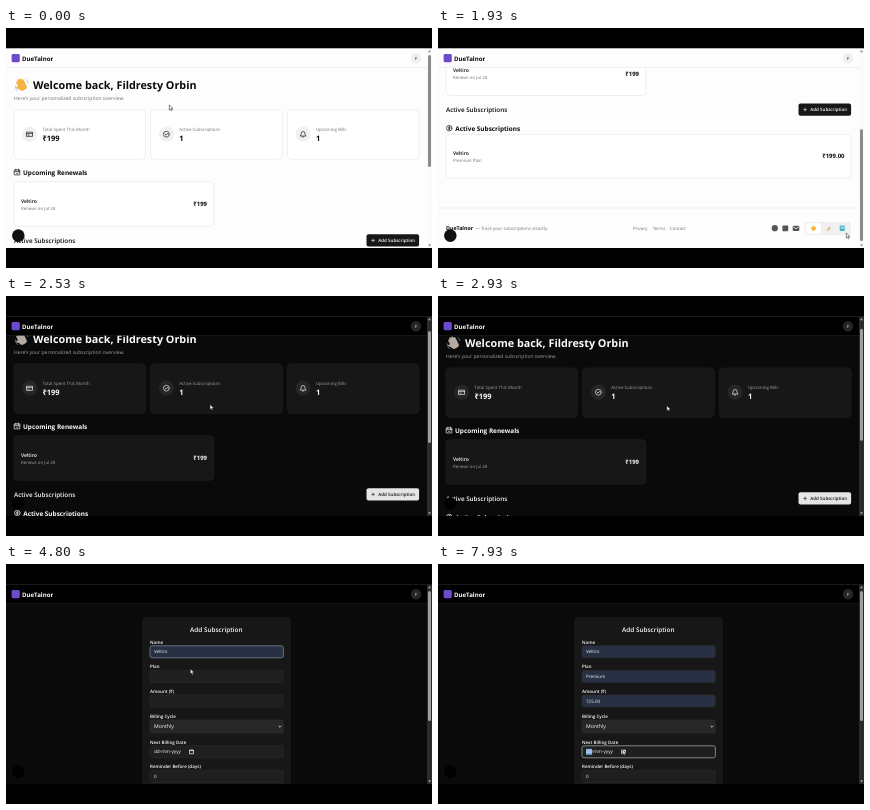
These frames come from a looping animation (426x240 px, 8000 ms). An HTML page:

```html
<!DOCTYPE html>
<html lang="en">
<head>
<meta charset="utf-8">
<title>Subscription dashboard</title>
<style>
html, body { margin: 0; width: 100%; height: 100%; overflow: hidden; background: #000; }
svg { display: block; width: 100%; height: 100%; }
svg {
  --bg: #fdfdfd; --head: #fdfdfd; --edge: #fdfdfd; --card: #fff; --line: #e4e4e4; --ink: #0a0a0a; --mute: #737373;
  --soft: #f0f0f0; --btn: #171717; --btnInk: #fafafa; --track: #fafafa; --thumb: #8b8b8b; --pick: #fff;
  --icon: #555; --badge: #111; --hand: #f3b33e;
}
svg.dark {
  --bg: #0a0a0a; --head: #000; --edge: #2c2c2c; --card: #171717; --line: #222; --ink: #fafafa; --mute: #a1a1a1;
  --soft: #262626; --btn: #e5e5e5; --btnInk: #171717; --track: #2b2b2b; --thumb: #9f9f9f; --pick: #a9b0b3;
  --icon: #b4b4b4; --badge: #000; --hand: #b5aaa2;
}
svg.dark.hover { --btn: #c4c4c4; }
text { font-family: "Open Sans", "Noto Sans", sans-serif; fill: var(--ink); text-rendering: geometricPrecision; white-space: pre; }
.b { font-weight: 700; }
.s { font-weight: 600; }
.m { fill: var(--mute); }
.bg { fill: var(--bg); }
.head { fill: var(--head); }
.card { fill: var(--card); stroke: var(--line); stroke-width: .6; }
.soft { fill: var(--soft); }
.rule { stroke: var(--line); stroke-width: .6; }
.btn { fill: var(--btn); }
.btnInk { fill: var(--btnInk); }
.icon { fill: none; stroke: var(--ink); stroke-width: .65; stroke-linecap: round; stroke-linejoin: round; }
.thumb { fill: var(--thumb); }
.gray { fill: var(--icon); }
.field { fill: #1f1f1f; stroke: #2c2c2c; stroke-width: .6; }
#cycleBox { fill: #272727; }
.filled { fill: #283143; }
.focus { stroke: #858585; stroke-width: 1; }
.filled.focus { stroke: #66707f; }
</style>
</head>
<body>
<svg id="stage" viewBox="0 0 426 240"></svg>
<script>
const LOOP = 8000, MAX_SCROLL = 130.8;
const APP = 'DueTalnor', USER = 'Fildresty Orbin', SERVICE = 'Veltiro';

const text = (x, y, size, cls, str, anchor = 'start', id = '') =>
  `<text x="${x}" y="${y}" font-size="${size}" class="${cls}" text-anchor="${anchor}" ${id && `id="${id}"`}>${str}</text>`;
const rect = (x, y, w, h, r, cls, extra = '') =>
  `<rect x="${x}" y="${y}" width="${w}" height="${h}" rx="${r}" class="${cls}" ${extra}/>`;
const circle = (x, y, r, cls, extra = '') => `<circle cx="${x}" cy="${y}" r="${r}" class="${cls}" ${extra}/>`;
const icon = (x, y, d) => `<path class="icon" transform="translate(${x} ${y})" d="${d}"/>`;

const ICONS = {
  wallet: 'M-2.8-2H2.8V2.2H-2.8ZM-2.8-.6H2.8M-1.6 1H-.6',
  check: 'M2.9 0A2.9 2.9 0 1 1-2.9 0A2.9 2.9 0 1 1 2.9 0M-1.2 0L-.3 .9L1.3-.8',
  bell: 'M-2.7 1.6Q-1.8 .8-1.8-.9A1.8 1.8 0 0 1 1.8-.9Q1.8 .8 2.7 1.6ZM-.6 2.8H.6',
  calendar: 'M-2.6-2.2H2.6V2.8H-2.6ZM-2.6-.5H2.6M-1.3-3V-1.5M1.3-3V-1.5M-.8 1.1L-.1 1.8L1.1 .5',
  coin: 'M2.8 0A2.8 2.8 0 1 1-2.8 0A2.8 2.8 0 1 1 2.8 0M1-1H-.4Q-1.3-.4-.4 0H.4Q1.3 .5 .4 1H-1M0-1.7V1.7'
};

const hand = `<g transform="translate(15.5 57) rotate(-28)" stroke-linecap="round" stroke="var(--hand)" stroke-width="2.1" fill="var(--hand)">
  <path d="M-2.6 0V-4.2M-.7 0V-5.6M1.3 0V-5.3M3.1 .6V-3.8M-2 3L-5 .2" />
  <rect x="-2.8" y="-.5" width="5.8" height="5.2" rx="2"/></g>
  <path d="M9.3 57.5Q9.3 61.5 12 63M19.5 51Q21.8 52.5 22 55" fill="none" stroke="#7fa9c9" stroke-width=".6"/>`;

const stat = (x, glyph, label, value) =>
  rect(x, 82, 131.6, 49.3, 4, 'card') + circle(x + 15.7, 106.2, 7.6, 'soft') + icon(x + 15.7, 106.2, ICONS[glyph]) +
  text(x + 28.5, 102.8, 4.42, 'm', label) + text(x + 28.5, 113, 7.5, 'b', value);

const footer = `<path class="rule" d="M0 310.8H421"/>` +
  text(8, 333.3, 5.3, 'b', APP) + text(37.5, 333, 4.4, 'm', '— Track your subscriptions smartly.') +
  text(195, 333, 4.4, 'm', 'Privacy') + text(214.7, 333, 4.4, 'm', 'Terms') + text(232, 333, 4.4, 'm', 'Contact') +
  circle(336.8, 331, 3.1, 'gray') + rect(344.4, 328.2, 5.8, 5.8, .8, 'gray') +
  rect(354.7, 328.5, 6.6, 5.2, .8, 'gray') + `<path d="M355 329.4L358 331.6L361 329.4" fill="none" stroke="var(--bg)" stroke-width=".7"/>` +
  rect(366.5, 324.6, 46.5, 13.4, 3, 'soft') + rect(368, 326, 15, 10.5, 2.5, '', 'id="pick" fill="var(--pick)"') +
  circle(375.5, 331.2, 2, '', 'fill="#f7b733" stroke="#f29b2b" stroke-width="1" stroke-dasharray=".8 .5"') +
  `<path d="M391.2 328.6A2.6 2.6 0 1 1 387.8 332.6A3.4 3.4 0 0 0 391.2 328.6" fill="#efb04a"/>` +
  rect(401.7, 328.3, 5, 5.6, .6, '', 'fill="#45b3c9"') + rect(402.5, 329.2, 3.4, 2.4, .2, '', 'fill="#8fdcea"');

const dashboard = hand +
  text(27, 61, 10.8, 'b', `Welcome back, ${USER}`) +
  text(8, 71.5, 5, 'm', 'Here’s your personalized subscription overview.') +
  stat(8, 'wallet', 'Total Spent This Month', '₹199') +
  stat(144.7, 'check', 'Active Subscriptions', '1') +
  stat(281.4, 'bell', 'Upcoming Bills', '1') +
  icon(11.2, 144.1, ICONS.calendar) + text(17, 146.5, 6.42, 'b', 'Upcoming Renewals') +
  rect(8, 153.7, 199.8, 44.6, 4, 'card') +
  text(15, 175.2, 5, 's', SERVICE) + text(15, 182, 4.37, 'm', 'Renews on Jul 28') + text(201, 178.4, 6, 'b', '₹199', 'end') +
  text(8, 214.8, 6.3, 's', 'Active Subscriptions') +
  rect(360.5, 206.3, 52.6, 12.2, 2, 'btn') +
  `<path d="M365.3 212.4H368.9M367.1 210.6V214.2" stroke="var(--btnInk)" stroke-width=".6"/>` +
  text(372.3, 214, 4.5, 'btnInk s', 'Add Subscription') +
  icon(11.3, 231, ICONS.coin) + text(17.3, 233.5, 6.42, 'b', 'Active Subscriptions') +
  rect(8, 237.4, 405, 43.6, 4, 'card') +
  text(15, 258.2, 5, 's', SERVICE) + text(15, 265, 4.37, 'm', 'Premium Plan') + text(406.5, 261.3, 6, 'b', '₹199.00', 'end') +
  footer;

const field = (id, label, y, h, value = '', size = 4.5) =>
  text(144, y - 2.3, 4.5, 's', label) + rect(144, y, 133.4, h, 2, 'field', `id="${id}Box"`) +
  text(148, y + h / 2 + 1.6, size, '', value, 'start', `${id}Text`);

const form = rect(136, 53.2, 149, 180, 4, '', 'fill="#171717"') +
  text(210.3, 68.1, 6.4, 's', 'Add Subscription', 'middle') +
  field('name', 'Name', 81.8, 12) + field('plan', 'Plan', 106.4, 12) + field('amount', 'Amount (₹)', 131, 12) +
  field('cycle', 'Billing Cycle', 156, 13, 'Monthly', 5.2) +
  `<path d="M272.6 161.8L274 163.2L275.4 161.8" fill="none" stroke="#fff" stroke-width=".7"/>` +
  field('date', 'Next Billing Date', 181.8, 12) +
  rect(148, 184.8, 6.2, 6, 0, '', 'id="dayMark" fill="#79a7dc"') + text(148, 189.4, 4.7, '', 'dd-mm-yyyy') +
  `<path d="M183.6 186H187.4V189.8H183.6ZM183.6 186.6H187.4" fill="none" stroke="#fff" stroke-width=".7"/>` +
  field('days', 'Reminder Before (days)', 206.4, 12.4, '0') +
  `<path id="spin" d="M268.6 136.2L270.2 134.3L271.8 136.2ZM268.6 138.2L270.2 140.1L271.8 138.2Z" fill="#ccc"/>` +
  rect(0, 0, .5, 5.4, 0, '', 'id="caret" fill="#fff"');

const stage = document.getElementById('stage');
stage.innerHTML = rect(0, 20.5, 426, 200, 0, 'bg') +
  `<g id="dashboard">${dashboard}</g><g id="form">${form}</g>` +
  rect(0, 20.5, 421, 18.8, 0, 'head') + `<path class="rule" d="M0 39.4H421"/>` +
  rect(5.6, 26, 8.2, 8.2, 1.4, '', 'fill="#6d4bd0"') + text(16, 32.5, 6.1, 'b', APP) +
  circle(410, 30.2, 5.2, 'soft') + text(410, 31.7, 4.3, '', USER[0], 'middle') +
  circle(12.3, 207.6, 6.3, '', 'fill="var(--badge)"') +
  rect(421, 20.5, 5, 199.5, 0, '', 'fill="var(--track)"') + rect(422, 27, 3, 112, 1.5, 'thumb', 'id="thumb"') +
  `<path class="thumb" d="M422 24.2L423.5 22L425 24.2ZM422 216.3L423.5 218.5L425 216.3Z"/>` +
  rect(0, 20.2, 426, .8, 0, '', 'fill="var(--edge)"') +
  `<path id="arrow" d="M0 0V5L1.2 4L2 5.7L2.9 5.3L2.1 3.6H3.7Z" fill="#fff" stroke="#111" stroke-width=".5"/>` +
  `<path id="beam" d="M-.9-2.6H.9M0-2.6V2.6M-.9 2.6H.9" stroke="#aaa" stroke-width=".5"/>` +
  `<path d="M0 0H426V20.2H0ZM0 220H426V240H0Z"/>`;

const $ = id => document.getElementById(id);
const show = (id, on) => $(id).setAttribute('visibility', on ? 'visible' : 'hidden');

// Keys are [time, ...values]; values ease between neighbouring keys.
function track(keys, t) {
  const i = keys.findIndex(k => k[0] > t);
  if (i < 0) return keys[keys.length - 1].slice(1);
  if (i === 0) return keys[0].slice(1);
  const a = keys[i - 1], b = keys[i];
  const u = (t - a[0]) / (b[0] - a[0]), e = u * u * (3 - 2 * u);
  return a.slice(1).map((v, j) => v + (b[j + 1] - v) * e);
}
const latest = (keys, t) => keys.reduce((v, k) => (t >= k[0] ? k[1] : v), '');

const SCROLL = [[330, 0], [1130, MAX_SCROLL], [2070, MAX_SCROLL], [2530, 14], [2680, 0], [2870, 0], [3230, MAX_SCROLL]];
const POINTER = [
  [0, 163.3, 77], [330, 166, 84], [1130, 300, 150], [1700, 404, 200], [1930, 408.3, 205], [2070, 404, 202],
  [2530, 204, 108.5], [2850, 215, 112], [3330, 397.4, 81], [3800, 398, 82], [4250, 200, 89], [4500, 198, 90],
  [4800, 184.4, 105], [5100, 184, 112], [5750, 182, 113], [6200, 174, 137], [6950, 174, 137], [7300, 178, 150], [7930, 184.4, 185.5]
];
const FOCUS = [[4200, 'name'], [5050, 'plan'], [6200, 'amount'], [7800, 'date']];
const TYPED = {
  name: [[4330, SERVICE[0]], [4460, SERVICE.slice(0, 2)], [4600, SERVICE]],
  plan: [[5400, 'P'], [5530, 'Pr'], [5730, 'Premium']],
  amount: [[6800, '7'], [6930, '72'], [7270, '725.00']]
};
const FORM_AT = 3870;

function draw(t) {
  const dark = t >= 2000, onForm = t >= FORM_AT;
  const [scroll] = track(SCROLL, t), [x, y] = track(POINTER, t);
  stage.setAttribute('class', (dark ? 'dark' : '') + (t > 3230 && !onForm ? ' hover' : ''));
  $('dashboard').setAttribute('transform', `translate(0 ${-scroll})`);
  $('dashboard').style.display = onForm ? 'none' : '';
  $('form').style.display = onForm ? '' : 'none';
  $('pick').setAttribute('x', dark ? 396.8 : 368);
  $('thumb').setAttribute('y', 27 + (onForm ? 0 : scroll / MAX_SCROLL * 74));
  $('thumb').setAttribute('height', onForm ? 130 : 112);

  const focus = latest(FOCUS, t), since = FOCUS.find(f => f[1] === focus);
  for (const id of ['name', 'plan', 'amount', 'date']) {
    const keys = TYPED[id];
    const filled = keys && t >= keys[keys.length - 1][0];
    $(id + 'Box').setAttribute('class', `field${filled ? ' filled' : ''}${focus === id ? ' focus' : ''}`);
    if (keys) $(id + 'Text').textContent = latest(keys, t);
  }
  const caretOn = onForm && since && focus !== 'date' && (t - since[0]) % 1060 < 530;
  show('caret', caretOn);
  if (caretOn) {
    $('caret').setAttribute('x', 148.3 + $(focus + 'Text').getComputedTextLength());
    $('caret').setAttribute('y', +$(focus + 'Box').getAttribute('y') + 3.3);
  }
  show('dayMark', onForm && focus === 'date');
  show('spin', onForm && focus === 'amount');

  const inField = onForm && x > 144 && x < 277 && [81.8, 106.4, 131].some(top => y > top && y < top + 12);
  show('beam', inField);
  show('arrow', !inField);
  for (const id of ['beam', 'arrow']) $(id).setAttribute('transform', `translate(${x} ${y})`);
}

function tick() {
  draw(performance.now() % LOOP);
  requestAnimationFrame(tick);
}
tick();
</script>
</body>
</html>
```
